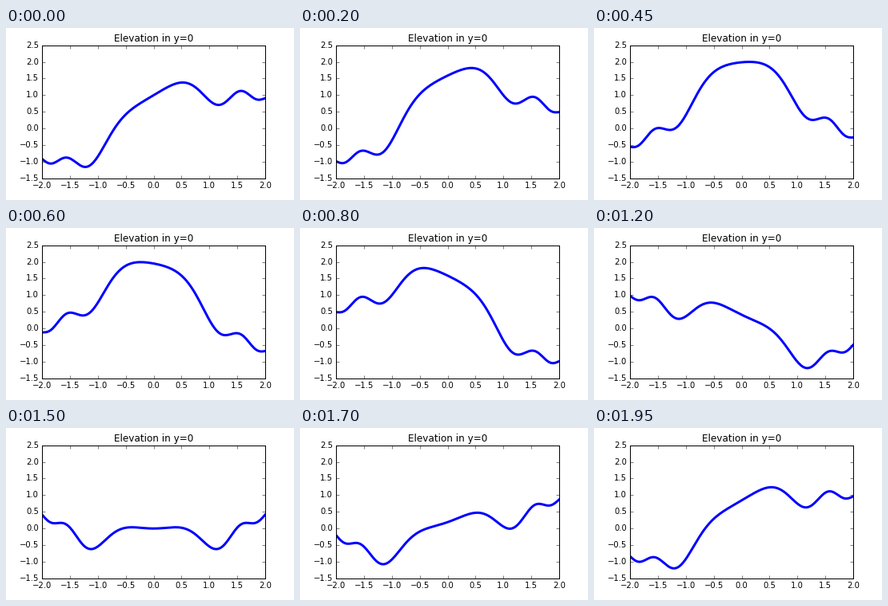
A matplotlib script that plays this animation: 360 by 216 pixels, repeating every 2 s.

```python
import numpy as np
import matplotlib.pyplot as plt
from matplotlib.animation import FuncAnimation

FRAMES = 40
INTERVAL = 50  # ms

plt.style.use("classic")
plt.rcParams.update({
    "font.family": "DejaVu Sans",
    "font.size": 10,
    "figure.dpi": 72,
    "savefig.dpi": "figure",
    "figure.facecolor": "white",
    "figure.subplot.left": 0.125,
    "figure.subplot.right": 0.9,
    "figure.subplot.bottom": 0.125,
    "figure.subplot.top": 0.9,
})

x = np.linspace(-2, 2, 200)


def elevation(phase):
    return np.sinc(x**2) + np.sin(x + phase)


fig, ax = plt.subplots(figsize=(5, 3), dpi=72)
ax.set_title("Elevation in y=0", fontsize=12)
ax.set_xlim(-2, 2)
ax.set_ylim(-1.5, 2.5)
ax.set_xticks(np.arange(-2, 2.1, 0.5))
ax.set_yticks(np.arange(-1.5, 2.6, 0.5))
line, = ax.plot(x, elevation(0), color="blue", lw=3)


def update(i):
    line.set_ydata(elevation(2 * np.pi * i / FRAMES))
    return line,


anim = FuncAnimation(fig, update, frames=FRAMES, interval=INTERVAL,
                     repeat=True, repeat_delay=0, blit=False)
plt.show()
```
